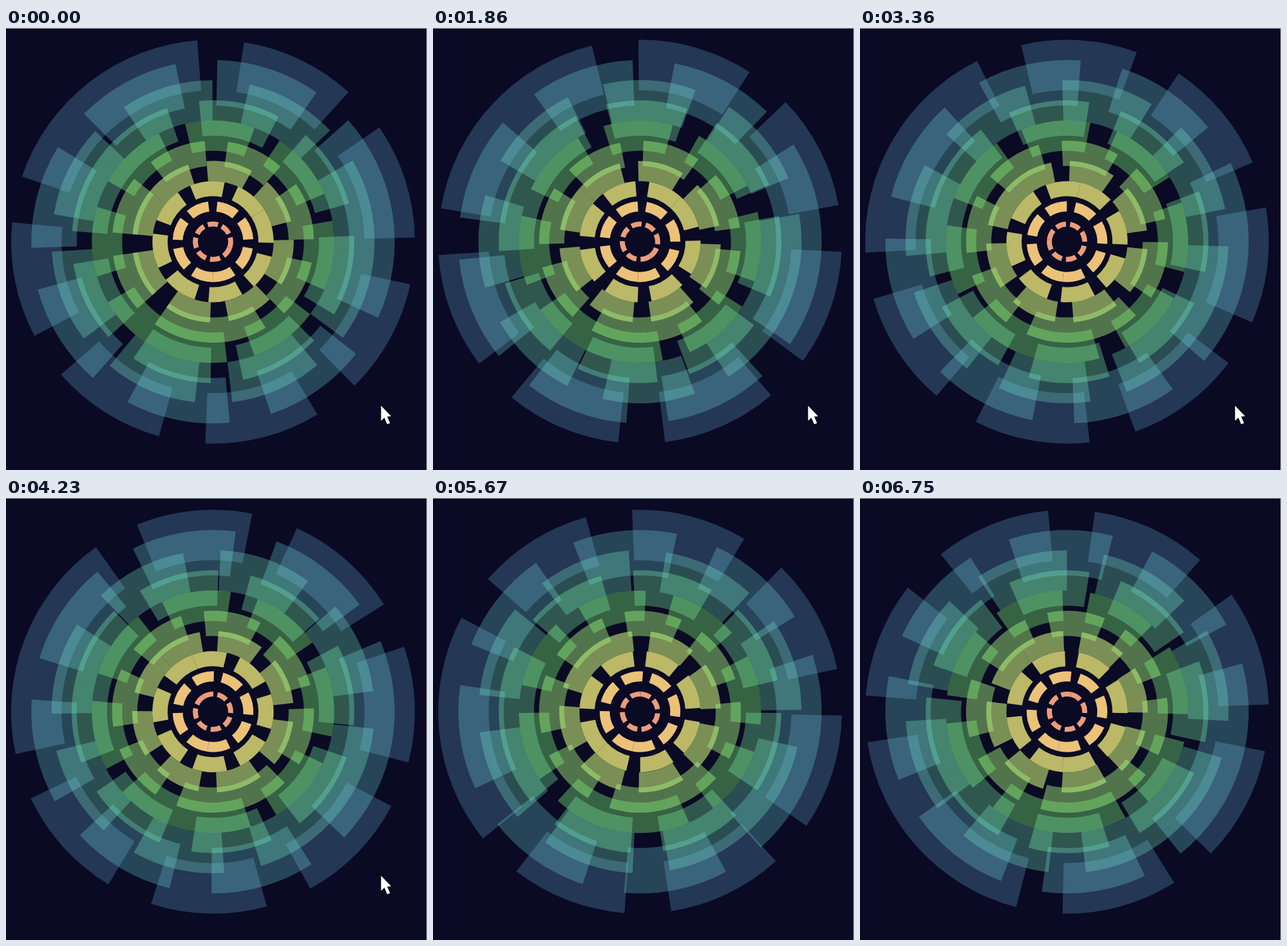
An HTML page with a canvas that plays this animation: 664x697 px, repeating every 6.85 s.

```html
<!DOCTYPE html>
<html lang="en">
<head>
<meta charset="utf-8">
<title>Turning rings</title>
<style>
  html, body { margin: 0; width: 100%; height: 100%; overflow: hidden; background: #0a0a24; }
  canvas { display: block; width: 664px; height: 697px; }
</style>
</head>
<body>
<canvas id="stage" width="664" height="697"></canvas>
<script>
const ctx = document.getElementById('stage').getContext('2d');
const CX = 326.5, CY = 337, UNIT = 31.84;
const LOOP = 6850, CURSOR_LEAVES = 5520;
const RAD = Math.PI / 180;

// Eight arcs with seven gaps; the last arc meets the first at the seam.
const ARC = 100 / 3, PITCH = 140 / 3;

// Innermost ring first. Each turns like a body on a long ellipse: fast at its
// peak angle, slow on the far side. Speed is the mean in degrees per second,
// phase the mean angle past the peak at the start.
const ECC = .72;
const rings = [
  { turn: 1,  speed: 13,  phase: -39, peak: 148 },
  { turn: 1,  speed: 8.3, phase: 141, peak: -81 },
  { turn: -1, speed: 9.9, phase: -49, peak: -168.5 },
  { turn: 1,  speed: 5,   phase: -89, peak: 14.2 },
  { turn: -1, speed: 5,   phase: 41,  peak: 222 },
  { turn: -1, speed: 5,   phase: -70, peak: -31.2 },
  { turn: -1, speed: 5,   phase: -43, peak: 85.9 },
  { turn: 1,  speed: 6,   phase: 17,  peak: -91.6 },
  { turn: 1,  speed: 6,   phase: 34,  peak: -131.9 },
  { turn: -1, speed: 6.1, phase: -46, peak: 98.1 }
];

// Angle past the peak, in degrees, for a mean angle in degrees.
function orbit(degrees) {
  const mean = (degrees - 360 * Math.round(degrees / 360)) * RAD;
  let e = Math.PI * Math.sign(mean);
  for (let i = 0; i < 10; i++) {
    e -= (e - ECC * Math.sin(e) - mean) / (1 - ECC * Math.cos(e));
  }
  return 2 / RAD * Math.atan2(Math.sqrt(1 + ECC) * Math.sin(e / 2),
                              Math.sqrt(1 - ECC) * Math.cos(e / 2));
}

function drawArc(outer, start) {
  const from = start * RAD, to = (start + ARC) * RAD;
  ctx.beginPath();
  ctx.arc(CX, CY, outer, from, to);
  ctx.arc(CX, CY, outer * .75, to, from, true);
  ctx.closePath();
  ctx.fill();
}

function drawRing(ring, k, t) {
  const seam = ring.peak + ring.turn * orbit(ring.phase + ring.speed * t / 1000);
  ctx.fillStyle = `hsla(${20 * k - 2}, 75%, 70%, ${Math.min(1, 2.35 / k)})`;
  for (let i = 0; i < 8; i++) drawArc(k * UNIT, seam + i * PITCH);
}

const pointer = new Path2D('M591.5 595.5V619.5L596.8 614.5L601.2 625L605.8 623L601.2 612.8L607.5 612.3Z');
function drawCursor() {
  ctx.lineWidth = 2;
  ctx.strokeStyle = '#000';
  ctx.stroke(pointer);
  ctx.fillStyle = '#fff';
  ctx.fill(pointer);
}

function draw(t) {
  ctx.fillStyle = '#0a0a24';
  ctx.fillRect(0, 0, 664, 697);
  rings.forEach((ring, i) => drawRing(ring, i + 1, t));
  if (t < CURSOR_LEAVES) drawCursor();
  ctx.fillStyle = '#a4a4a8';
  ctx.fillRect(0, 0, 664, 1);
  ctx.fillRect(663, 0, 1, 697);
}

// Poses hold for 120 ms and 150 ms in turn.
function heldTime(t) {
  const rest = t % 270;
  return t - rest + (rest >= 120 ? 120 : 0);
}

const origin = performance.now();
let shown = -1;
function tick() {
  const t = heldTime(Math.floor((performance.now() - origin) % LOOP));
  if (t !== shown) draw(shown = t);
  requestAnimationFrame(tick);
}
tick();
</script>
</body>
</html>
```
